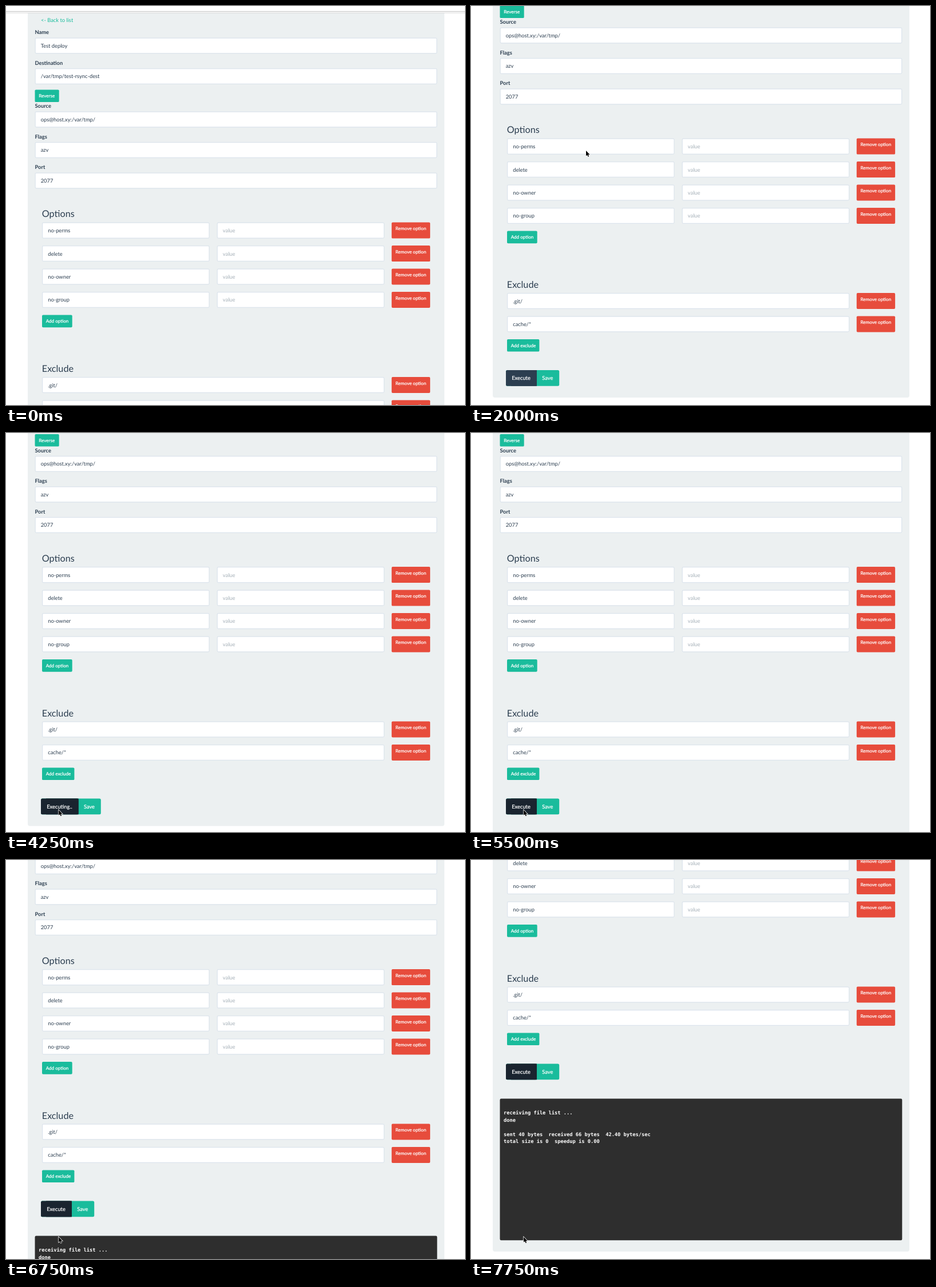
These frames come from a looping animation (802x698 px, 8 s). An HTML page:

```html
<!DOCTYPE html>
<html lang="en">
<head>
<meta charset="utf-8">
<title>Deploy form</title>
<style>
  html, body { margin: 0; width: 100%; height: 100%; overflow: hidden; background: #fff; }
  svg { display: block; width: 802px; height: 698px; }
  text { font: 9.33px Lato, sans-serif; fill: #2c3e50; white-space: pre; text-rendering: geometricPrecision; }
  .label { font-weight: 700; }
  .head { font-size: 16.18px; }
  .link { fill: #18bc9c; }
  .hint { fill: #a5b0b8; }
  .btn, .big { fill: #fff; stroke: #fff; stroke-width: .22px; }
  .btn { font-size: 8.09px; }
  .log { font: 700 8.71px "DejaVu Sans Mono", monospace; fill: #fff; }
</style>
</head>
<body>
<svg id="stage" viewBox="0 0 802 698"></svg>
<script>
const TEAL = '#1abc9c', RED = '#e74c3c', NAVY = '#2c3e50', PRESSED = '#1a242f';
const LOOP = 8000;
const stage = document.getElementById('stage');

function add(parent, tag, attrs, content = '') {
  const el = document.createElementNS('http://www.w3.org/2000/svg', tag);
  for (const key in attrs) el.setAttribute(key, attrs[key]);
  el.textContent = content;
  parent.append(el);
  return el;
}

const page = add(stage, 'g', {});
const rect = (x, y, width, height, fill, rx = 0, parent = page) =>
  add(parent, 'rect', { x, y, width, height, fill, rx });
const text = (x, y, content, cls = '') => add(page, 'text', { x, y, class: cls }, content);

function input(x, y, width, value, cls) {
  const box = rect(x + .62, y + .62, width - 1.24, 26.8, '#fff', 1.8);
  box.setAttribute('stroke', '#dce4ec');
  box.setAttribute('stroke-width', 1.24);
  text(x + 10.2, y + 17.5, value, cls);
}

function button(x, y, width, label, fill = TEAL, height = 21.7) {
  rect(x, y, width, height, fill, 1.9);
  text(x + 6.7, y + 13.8, label, 'btn');
}

const removeButton = y => button(673.8, y, 67.3, 'Remove option', RED, 28);

// Page, laid out at scroll position 0
const panel = rect(38, -20, 728, 852, '#ecf0f1', 3.7);
text(61, 28.4, '<- Back to list', 'link');

const fields = [
  ['Name', 'Test deploy', 55.4],
  ['Destination', '/var/tmp/test-rsync-dest', 108.9],
  ['Source', 'ops@host.xy:/var/tmp/', 184.4],
  ['Flags', 'azv', 237.9],
  ['Port', '2077', 291.4]
];
for (const [label, value, y] of fields) {
  text(50.5, y - 6.2, label, 'label');
  input(50.5, y, 702.8, value);
}
button(50.5, 146.4, 42.2, 'Reverse');

text(62.8, 369, 'Options', 'head');
['no-perms', 'delete', 'no-owner', 'no-group'].forEach((name, i) => {
  const y = 378.6 + 40.44 * i;
  input(63, y, 292.6, name);
  input(368.6, y, 292.6, 'value', 'hint');
  removeButton(y);
});
button(63, 540.5, 52.7, 'Add option');

text(62.8, 640, 'Exclude', 'head');
['.git/', 'cache/*'].forEach((name, i) => {
  const y = 649 + 40.44 * i;
  input(63, y, 598.2, name);
  removeButton(y);
});
button(63, 729.9, 56.4, 'Add exclude');

const group = rect(61, 784, 93.2, 27.8, TEAL, 2.5);
const run = [rect(61, 784, 54, 27.8, NAVY, 2.5), rect(70, 784, 45, 27.8, NAVY)];
const runText = text(71.2, 801.4, 'Execute', 'big');
const saveText = text(124.3, 801.4, 'Save', 'big');

const log = add(page, 'g', {});
rect(50.5, 845, 702.8, 247.8, '#2e2e2e', 2.2, log);
['receiving file list ...', 'done', '',
  'sent 40 bytes  received 66 bytes  42.40 bytes/sec',
  'total size is 0  speedup is 0.00'
].forEach((line, i) => log.append(text(57, 872.7 + 12.44 * i, line, 'log')));

// Window edge and pointer stay fixed over the page
const edge = add(stage, 'g', {});
rect(0, 0, 802, 12, '#fff', 0, edge);
rect(0, 9, 802, 1, '#c2c2c2', 0, edge);
rect(0, 11.5, 802, 1, '#d6d6d6', 0, edge);

const pointer = add(stage, 'path', {
  d: 'M0 0V9.4L2.1 7.5 3.6 10.8 5.1 10.1 3.7 7H6.6Z',
  fill: '#000', stroke: '#fff', 'stroke-width': 1.3, 'paint-order': 'stroke'
});

// [time, value...]: each value holds until the next step
const scrollSteps = [
  [0, 0], [1000, 8], [1250, 135], [1750, 137], [2000, 147], [2250, 149],
  [2500, 147], [2750, 144.5], [6500, 160], [6750, 187.5], [7000, 272],
  [7250, 276], [7500, 257.5], [7750, 427.5]
];
const pointerSteps = [
  [0, -50, -50], [250, 412, 231], [500, 400, 233], [750, 201, 253],
  [2500, 184, 330], [2750, 136, 452], [3000, 117, 603], [3250, 92, 659], [3500, 92, 659.4]
];
const at = (steps, t) => steps.findLast(step => step[0] <= t);

function draw(t) {
  page.setAttribute('transform', `translate(0 ${-at(scrollSteps, t)[1]})`);
  const [, x, y] = at(pointerSteps, t);
  pointer.setAttribute('transform', `translate(${x} ${y})`);
  edge.style.display = t < 500 ? '' : 'none';

  const busy = t >= 4250 && t < 5500;
  const extra = busy ? 11.6 : 0;
  group.setAttribute('width', 93.2 + extra);
  run[0].setAttribute('width', 54 + extra);
  run[1].setAttribute('width', 45 + extra);
  for (const part of run) part.setAttribute('fill', t >= 4000 ? PRESSED : NAVY);
  runText.textContent = busy ? 'Executing..' : 'Execute';
  saveText.setAttribute('x', 124.3 + extra);

  const done = t >= 5250;
  panel.setAttribute('height', done ? 1132.5 : 852);
  log.style.display = done ? '' : 'none';
}

const start = performance.now();
function tick() {
  draw((performance.now() - start) % LOOP);
  requestAnimationFrame(tick);
}
tick();
</script>
</body>
</html>
```
